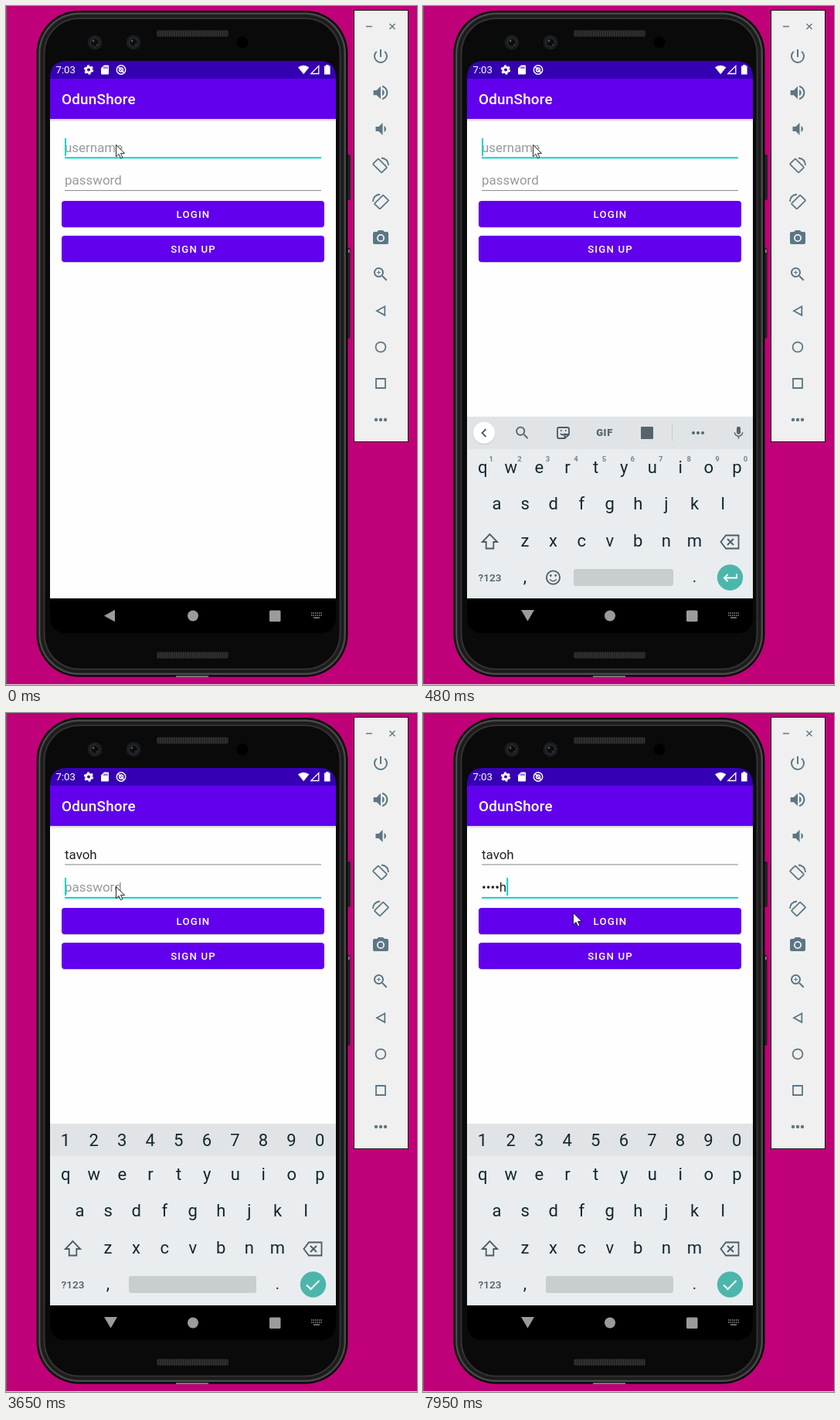
Animation, 532 px wide and 878 px high, one loop 8000 ms. Source, as an HTML page:

```html
<!DOCTYPE html>
<html lang="en">
<head>
<meta charset="utf-8">
<title>Login on a phone emulator</title>
<style>
  html, body { margin: 0; width: 100%; height: 100%; overflow: hidden; background: #c00078; }
  svg { display: block; font-family: Roboto, sans-serif; }
  .mid { text-anchor: middle; }
  .field { font-size: 16.96px; fill: #222; }
  .hint { fill: #999; }
  .button { font-size: 13.19px; font-weight: 500; letter-spacing: 1.18px; fill: #fff; }
  .key { font-size: 22px; fill: #14272f; }
  .sup { font-size: 9.5px; font-weight: 700; fill: #78848a; }
  .word { font-size: 17px; fill: #5c676d; }
  .line { fill: none; stroke: #4b5b64; stroke-width: 1.8; }
  .white { fill: none; stroke: #fff; stroke-width: 2; }
  .tool { fill: none; stroke: #5b7785; stroke-width: 1.8; }
</style>
</head>
<body>
<svg id="stage" width="532" height="878" viewBox="0 0 532 878"></svg>
<script>
const PERIOD = 8000;
const TEAL = '#08d5c4', SLATE = '#5b7785', GREY = '#56646c';
const stage = document.getElementById('stage');

const rect = (x, y, w, h, fill, r = 0, more = '') =>
  `<rect x="${x}" y="${y}" width="${w}" height="${h}" rx="${r}" fill="${fill}" ${more}/>`;
const dot = (x, y, r, fill, more = '') => `<circle cx="${x}" cy="${y}" r="${r}" fill="${fill}" ${more}/>`;
const path = (d, cls, style = '') => `<path d="${d}" class="${cls}" style="${style}"/>`;
const fillPath = (d, fill) => `<path d="${d}" fill="${fill}"/>`;
const text = (x, y, cls, s, more = '') => `<text x="${x}" y="${y}" class="${cls}" ${more}>${s}</text>`;
const icon = (d, x, y, size, fill) =>
  `<path d="${d}" fill="${fill}" fill-rule="evenodd" transform="translate(${x - size / 2} ${y - size / 2}) scale(${size / 24})"/>`;
const row = (chars, x, y, cls) =>
  [...chars].map((c, i) => text(x + 36.57 * i, y, cls + ' mid', c)).join('');
const dots = (x, y, gap, r, fill) => [-gap, 0, gap].map(d => dot(x + d, y, r, fill)).join('');

const ICONS = {
  power: 'M13 3h-2v10h2V3zm4.83 2.17l-1.42 1.42A6.92 6.92 0 0 1 19 12a7 7 0 1 1-11.42-5.42L6.17 5.17A8.93 8.93 0 0 0 3 12a9 9 0 0 0 18 0c0-2.74-1.23-5.18-3.17-6.83z',
  louder: 'M3 9v6h4l5 5V4L7 9H3zm13.5 3c0-1.77-1.02-3.29-2.5-4.03v8.05c1.48-.73 2.5-2.25 2.5-4.02zM14 3.23v2.06c2.89.86 5 3.54 5 6.71s-2.11 5.85-5 6.71v2.06c4.01-.91 7-4.49 7-8.77s-2.99-7.86-7-8.77z',
  quieter: 'M18.5 12c0-1.77-1.02-3.29-2.5-4.03v8.05c1.48-.73 2.5-2.25 2.5-4.02zM5 9v6h4l5 5V4L9 9H5z',
  camera: 'M9 2L7.17 4H4a2 2 0 0 0-2 2v12a2 2 0 0 0 2 2h16a2 2 0 0 0 2-2V6a2 2 0 0 0-2-2h-3.17L15 2H9zm3 15a5 5 0 1 1 0-10 5 5 0 0 1 0 10zm0-1.8a3.2 3.2 0 1 0 0-6.4 3.2 3.2 0 0 0 0 6.4z',
  search: 'M15.5 14h-.79l-.28-.27A6.5 6.5 0 1 0 13.73 14.43l.27.28v.79l5 4.99L20.49 19l-4.99-5zm-6 0a4.5 4.5 0 1 1 0-9 4.5 4.5 0 0 1 0 9z',
  plus: 'M12 10h-2v2H9v-2H7V9h2V7h1v2h2v1z',
  mic: 'M12 14a3 3 0 0 0 3-3V5a3 3 0 0 0-6 0v6a3 3 0 0 0 3 3zm5.3-3c0 3-2.54 5.1-5.3 5.1S6.7 14 6.7 11H5c0 3.41 2.72 6.23 6 6.72V21h2v-3.28c3.28-.48 6-3.3 6-6.72h-1.7z',
};

const speaker = y => rect(195, y, 93, 9, '#202020', 3) +
  `<path d="M196 ${y + 4.5}H287" stroke="#343434" stroke-width="7" stroke-dasharray="1.5 1.5"/>`;
const lens = x => dot(x, 47, 9.5, '#1a1d1f') + dot(x, 47, 5.5, '#0b0d0f', 'stroke="#30373b"') +
  dot(x - 2, 45, 1.5, '#4b5458') + dot(x + 3, 50, 1, '#3b4347');
const shell = (inset, fill) =>
  rect(39.5 + inset, 6 + inset, 403 - 2 * inset, 861.5 - 2 * inset, fill, 55 - inset);

const phone = () =>
  rect(0, 0, 1.2, 878, '#85566f') + rect(0, 877, 532, 1, '#ddd') +
  rect(440, 192, 6, 59, '#222', 2) + rect(440, 313, 5.5, 117, '#222', 2) + rect(443, 315, 1.5, 4, '#999') +
  shell(0, '#0c0c0c') + shell(2.5, '#484848') + shell(5, '#1c1c1c') + shell(9, '#333') + shell(11, '#0a0a0a') +
  rect(220, 866, 42, 2, '#777') +
  speaker(31) + speaker(835) + lens(115) + lens(165) + dot(306, 47, 7.5, '#000');

const statusBar = () =>
  rect(57, 71, 370, 23, '#3500b3') +
  text(64.5, 87.3, '', '7:03', 'font-size="13.2" fill="#fff"') +
  dot(107, 82.5, 3.4, 'none', 'stroke="#fff" stroke-width="2.8"') +
  dot(107, 82.5, 5.2, 'none', 'stroke="#fff" stroke-width="2" stroke-dasharray="2.9 2.545"') +
  fillPath('M127 76.5h5q1 0 1 1v10q0 1-1 1h-8q-1 0-1-1v-7z', '#fff') +
  path('M127 78.5v2.5M129 78.5v2.5M131 78.5v2.5', 'line', 'stroke:#3500b3;stroke-width:1') +
  dot(149, 82.5, 5.7, 'none', 'stroke="#fff" stroke-width="1.5"') +
  dot(149, 82.5, 2.5, 'none', 'stroke="#fff" stroke-width="1.4"') +
  path('M145.5 79l7 7', 'white', 'stroke-width:1.4') +
  fillPath('M378 79.3q7-5 14.4 0L385.2 88.3z', '#fff') +
  path('M404.8 77.5v10h-10z', 'white', 'stroke-width:1.3') +
  fillPath('M412 77.5h2v-1.5h3.6v1.5h2v11H412z', '#fff');

const button = (y, label) =>
  rect(72, y + 1, 340, 34, '#000', 4, 'opacity=".2"') +
  rect(72, y, 340, 34, '#6200ee', 4) + text(242.5, y + 22, 'button mid', label);

const field = (id, y, hint) =>
  text(76, y, 'field hint', hint, `id="${id}Hint"`) +
  text(76, y, 'field', '', `id="${id}"`) +
  rect(76, y + 1.5, 0, 1, '#222', 0, `id="${id}Mark"`) +
  rect(76, y - 18, 2, 23, TEAL, 0, `id="${id}Caret"`) +
  rect(76, y + 6, 332, 1, '#888', 0, `id="${id}Line"`);

const app = () =>
  rect(57, 94, 370, 672, '#fefefe') +
  rect(57, 146, 370, 4, 'url(#shade)') +
  rect(57, 94, 370, 52, '#6200ee') + statusBar() +
  text(72, 127, '', 'OdunShore', 'font-size="18.84" font-weight="500" letter-spacing=".24" fill="#fff"') +
  field('user', 189, 'username') + field('pass', 231, 'password') +
  button(252, 'LOGIN') + button(297, 'SIGN UP');

const navBar = () =>
  rect(57, 766, 370, 45, '#000') +
  `<path id="back" fill="#9b9b9b"/>` +
  dot(242, 788.5, 7, '#9b9b9b') + rect(341, 781.5, 14.5, 14.5, '#9b9b9b', 1.5) +
  `<g stroke="#8a8a8a" stroke-width="1.5"><path d="M395 785h14M395 788h14" stroke-dasharray="1.5 1"/><path d="M398 791h8"/></g>`;

const keyboard = () => `<g id="keyboard">` +
  rect(57, 531, 370, 235, '#e9edf0') + rect(57, 531, 370, 42, '#e0e4e7') +
  row('qwertyuiop', 77.3, 604, 'key') + row('asdfghjkl', 95.5, 651, 'key') +
  row('zxcvbnm', 132, 699, 'key') +
  path('M86.5 683l-9.7 10h4.9v8.5h9.6v-8.5h4.9z', 'line') +
  path('M392 684.5h16.5v17H392l-6.5-8.5zM394 689l8 8m0-8l-8 8', 'line') +
  text(86.5, 743.8, 'mid', '?123', 'font-size="13.6" font-weight="500" fill="#4b5b64"') +
  text(132, 745, 'key mid', ',') + text(351.5, 745, 'key mid', '.', 'style="font-size:20px"') +
  dot(397.5, 739, 16.7, '#4db6ac') +
  `<g id="openKeys">` + row('1234567890', 88.3, 589, 'sup') +
  dot(168.5, 739, 8.6, 'none', 'class="line"') +
  dot(165.3, 736.5, 1.4, GREY) + dot(171.7, 736.5, 1.4, GREY) +
  path('M164.2 741.5q4.300 4.500 8.600 0', 'line', 'stroke-width:1.6') +
  rect(195, 728, 129, 22, '#c8cdd0', 3) +
  path('M406 734.5v5h-16m4.5-4.5l-4.5 4.5 4.5 4.5', 'white') +
  icon(ICONS.mic, 408.5, 552, 20, GREY) +
  dot(79, 553, 14.3, '#000', 'opacity=".12"') + dot(79, 552, 14, '#fff') + `<path id="chevron" class="line"/></g>` +
  `<g id="tools">` + icon(ICONS.search, 128.5, 552, 22, GREY) +
  path('M176 545h11q2 0 2 2v7l-5.5 5H176q-2 0-2-2v-10q0-2 2-2zM183.5 559v-5h5.5M178 553q3 3 6 0M178 549h1.5M184 549h1.5', 'line') +
  text(235, 556.3, 'mid', 'GIF', `font-size="13" font-weight="900" fill="${GREY}" letter-spacing=".6"`) +
  rect(282, 544, 16, 16, GREY, 1) + rect(322, 541, 1, 22, '#c6cccf') +
  dots(356, 552, 6, 2, GREY) + `</g>` +
  `<g id="words">` + rect(187, 540, 1, 23, '#c6cccf') + rect(294.5, 540, 1, 23, '#c6cccf') +
  text(139.5, 558, 'word mid', '') +
  text(241, 558, 'word mid', '', 'style="font-weight:700;fill:#0b0d0e"') +
  text(342, 558, 'word mid', '') + `</g>` +
  `<g id="secretKeys">` + row('1234567890', 77, 560, 'key') +
  rect(159, 728, 165, 22, '#c8cdd0', 3) + path('M389 739.5l5.5 5.5 11-11', 'white') + `</g></g>`;

const rotateIcon = (y, flip) => `<g class="tool" transform="translate(485 ${y}) scale(${flip} 1)">` +
  `<rect x="-5" y="-8" width="10" height="16" rx="1" transform="translate(-1 .5) rotate(-45)"/>` +
  `<path d="M1-9.500q8.500 1 9 9.500"/></g>`;

const toolbar = () =>
  rect(450.5, 5.5, 70, 558, '#f0f0f0', 0, 'stroke="#111"') +
  path('M466 26.5h8M496.5 23l7 7m0-7l-7 7', 'tool', 'stroke-width:1.4') +
  icon(ICONS.power, 485, 65, 24, SLATE) + icon(ICONS.louder, 485, 112, 25, SLATE) +
  icon(ICONS.quieter, 485.5, 159, 24, SLATE) +
  rotateIcon(206, 1) + rotateIcon(253, -1) +
  icon(ICONS.camera, 485, 300, 24, SLATE) +
  icon(ICONS.search + ICONS.plus, 485, 347, 24, SLATE) +
  path('M490.3 388.5v11.4l-10.3-5.7z', 'tool') + dot(485, 441, 6.4, 'none', 'class="tool"') +
  path('M479 482h12v12h-12z', 'tool') + dots(485, 535, 6, 2.2, SLATE);

stage.innerHTML = `<defs>
  <linearGradient id="shade" x2="0" y2="1"><stop stop-color="#d2d2d2"/><stop offset="1" stop-color="#fefefe"/></linearGradient>
  <clipPath id="screen"><path d="M57 93q0-22 22-22h326q22 0 22 22v696q0 22-22 22H79q-22 0-22-22z"/></clipPath></defs>` +
  rect(0, 0, 532, 878, '#c00078') + phone() +
  `<g clip-path="url(#screen)">${app()}${navBar()}${keyboard()}</g>` + toolbar() +
  `<path id="mouse" d="M.5.5v15.300l3.500-3.300 2.500 5.300 2.400-1-2.400-5.200h5z" fill="#fff" stroke="#111" stroke-width=".9"/>`;

const $ = id => document.getElementById(id);
const words = $('words').querySelectorAll('text');

// Each list holds [start time, value...]; the latest started entry applies.
const USER = [[0, ''], [910, 't', 'the', 'to'], [1430, 'ta', 'taking', 'tax'], [1710, 'tav', 'tavern', 'tab'],
  [2020, 'tavo', 'tango', 'taco'], [2330, 'tavoh', 'Tavoh', 'Navoh']];
const PASS = [[0, ''], [4320, 't'], [4830, '•a'], [5540, '••v'], [6500, '•••o'], [6780, '••••h']];
const USER_CARET = [[0, 1], [120, 0], [480, 1], [1280, 0], [1430, 1], [2760, 0], [3240, 1], [3650, 0]];
const PASS_CARET = [[0, 0], [3390, 1], [4170, 0], [4320, 1], [5260, 0], [5540, 1], [6070, 0], [6500, 1], [7340, 0], [7800, 1]];
const MOUSE = [[0, 142, 179], [2880, 141, 199], [3000, 139, 216], [3120, 142, 224], [7800, 158, 240], [7950, 194, 258]];
const RISE = [[0, 60, 0], [120, 16, .5], [240, 3, .95], [360, .5, 1], [480, 0, 1]];
const at = (list, t) => list.findLast(entry => entry[0] <= t).slice(1);

const show = (id, on) => $(id).setAttribute('visibility', on ? 'inherit' : 'hidden');
function set(id, attrs) {
  for (const name in attrs) $(id).setAttribute(name, attrs[name]);
}

function drawField(id, value, caret, focused, composing, y) {
  $(id).textContent = value;
  const width = value ? $(id).getComputedTextLength() : 0;
  show(id + 'Hint', !value);
  show(id + 'Caret', caret);
  set(id + 'Caret', { x: 76 + width });
  set(id + 'Mark', { width: composing ? width : 0 });
  set(id + 'Line', focused ? { y, height: 2, fill: TEAL } : { y: y + .2, height: 1, fill: '#858585' });
}

function draw(t) {
  const [name, best, other] = at(USER, t);
  const secret = t >= 3650;
  drawField('user', name, at(USER_CARET, t)[0], !secret, !secret, 195.3);
  drawField('pass', at(PASS, t)[0], at(PASS_CARET, t)[0], t >= 3390, false, 237.9);

  [name, best, other].forEach((word, i) => words[i].textContent = word || '');
  show('openKeys', !secret);
  show('secretKeys', secret);
  show('tools', !name);
  show('words', name && !secret);
  set('chevron', { d: name ? 'M76.5 547l5 5-5 5' : 'M81.5 547l-5 5 5 5' });

  const [drop, opacity] = at(RISE, t);
  set('keyboard', { transform: `translate(0 ${drop})`, opacity });
  set('back', { d: t < 120 ? 'M127 788.5l14-7.700v15.400z' : 'M127 781h17l-8.500 14.500z' });
  set('mouse', { transform: `translate(${at(MOUSE, t)})` });
}

function tick() {
  draw(performance.now() % PERIOD);
  requestAnimationFrame(tick);
}
tick();
</script>
</body>
</html>
```
